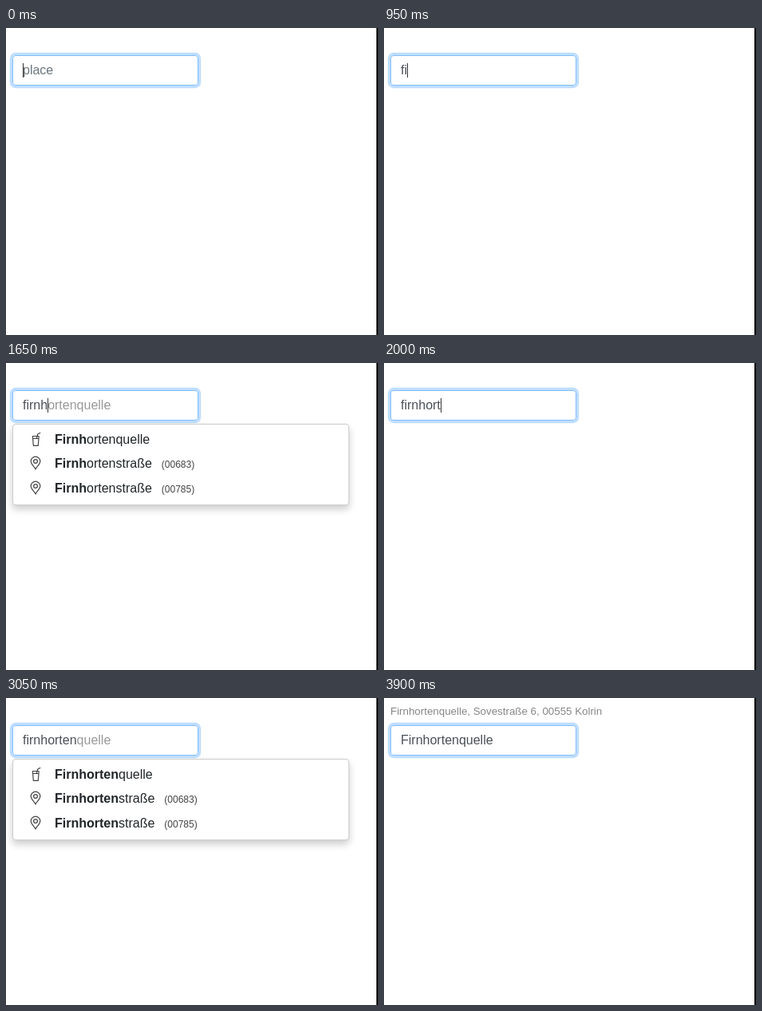
Animation of 466x384 px, one loop 4000 ms. Source, as an HTML page:

```html
<!DOCTYPE html>
<html lang="de">
<head>
<meta charset="utf-8">
<title>Place search</title>
<style>
  html, body { margin: 0; width: 100%; height: 100%; overflow: hidden; background: #fff; }
  #stage {
    position: relative; width: 466px; height: 384px; overflow: hidden;
    font: 16px/24px "Liberation Sans", Arial, sans-serif; color: #212529; white-space: pre;
  }
  #stage * { box-sizing: border-box; }
  #edge { position: absolute; right: 0; top: 0; width: 2px; height: 100%; background: #000; }
  #address { position: absolute; left: 8px; top: 5px; font-size: 13.33px; color: #868686; }
  #field {
    position: absolute; left: 8px; top: 34px; width: 233px; height: 38px; padding: 6px 12px;
    border: 1px solid #80bdff; border-radius: 4px; box-shadow: 0 0 0 3.2px rgba(0, 123, 255, .25);
    color: #495057;
  }
  .placeholder { color: #6c757d; }
  .hint { color: #999; }
  #caret { position: absolute; top: 9px; width: 1px; height: 18px; background: #333; }
  #list {
    position: absolute; left: 8px; top: 76px; width: 422px; background: #fff;
    border: 1px solid #ccc; border-radius: 4px; box-shadow: 0 5px 10px rgba(0, 0, 0, .2);
  }
  .row { position: absolute; left: 52px; }
  .row small { margin-left: 12px; font-size: 12px; color: #444; }
  .row svg {
    position: absolute; left: -32px; top: 2px; width: 16px; height: 20px;
    fill: none; stroke: #444; stroke-width: 1.2; stroke-linejoin: round;
  }
</style>
</head>
<body>
<div id="stage">
  <div id="address"></div>
  <div id="field"><span id="typed"></span><span id="caret"></span><span id="rest"></span></div>
  <div id="list"></div>
  <div id="edge"></div>
</div>
<script>
const LOOP = 4000;
const PLACE = 'Firnhortenquelle';
const ADDRESS = PLACE + ', Sovestraße 6, 00555 Kolrin';

const icons = {
  cup: '<path d="M3.8 5.5h8.6M4.4 5.5l.9 11.8h6l.9-11.8M4.8 8.5h7.2M9.2 8.5l1.6-5.5 3.4-1.8"/>',
  pin: '<path d="M8 17C6.4 13.4 2.2 10.6 2.2 7a5.8 5.8 0 0 1 11.6 0c0 3.6-4.2 6.4-5.8 10z"/><circle cx="8" cy="7" r="2.4"/>'
};

const garden = [
  ['cup', PLACE],
  ['pin', 'Firnhortenstraße', '(00683)'],
  ['pin', 'Firnhortenstraße', '(00785)']
];
const four = [...garden, ['cup', 'Firnra Galomesina']];
const many = [
  ...four,
  ['pin', 'Fandelostraße', '(00437)'],
  ['pin', 'Fulverweg', '(00351)'],
  ['cup', 'Fostelino'],
  ['pin', 'Fennuralee', '(00169)'],
  ['cup', 'Fadrosa Bar'],
  ['pin', 'Feldorunweg', '(00629)']
];

// start time, number of typed letters, suggestions
const steps = [
  [0, 0], [400, 1], [550, 1, many], [800, 2], [1050, 3], [1150, 4],
  [1250, 4, four], [1500, 5], [1600, 5, garden], [1750, 6], [1850, 7],
  [1950, 8], [2150, 9], [2250, 9, garden], [2550, 10], [2650, 10, garden],
  [3350, PLACE.length]
];
const caretOff = [[50, 400], [3050, 3350], [3850, LOOP]];

const el = id => document.getElementById(id);
const [typed, caret, rest, list, address] = ['typed', 'caret', 'rest', 'list', 'address'].map(el);

function rowHtml([icon, name, code], i, count) {
  const top = Math.round(83.6 + 30.7 * i) - 77;
  return `<div class="row" style="top:${top}px"><svg viewBox="0 0 16 20">${icons[icon]}</svg>` +
    `<b>${name.slice(0, count)}</b>${name.slice(count)}${code ? `<small>${code}</small>` : ''}</div>`;
}

function show([, count, rows]) {
  const done = count === PLACE.length;
  typed.textContent = done ? PLACE : PLACE.toLowerCase().slice(0, count);
  rest.textContent = !count ? 'place' : rows ? PLACE.slice(count) : '';
  rest.className = count ? 'hint' : 'placeholder';
  address.textContent = done ? ADDRESS : '';
  list.hidden = !rows;
  if (rows) {
    list.style.height = Math.round(9.5 + 30.7 * rows.length) + 'px';
    list.innerHTML = rows.map((row, i) => rowHtml(row, i, count)).join('');
  }
}

let current;
const start = performance.now();

function draw() {
  const t = (performance.now() - start) % LOOP;
  const step = steps.findLast(([from]) => from <= t);
  if (step !== current) show(current = step);
  const hidden = caretOff.some(([from, to]) => t >= from && t < to);
  caret.style.visibility = hidden ? 'hidden' : 'visible';
  requestAnimationFrame(draw);
}
draw();
</script>
</body>
</html>
```
